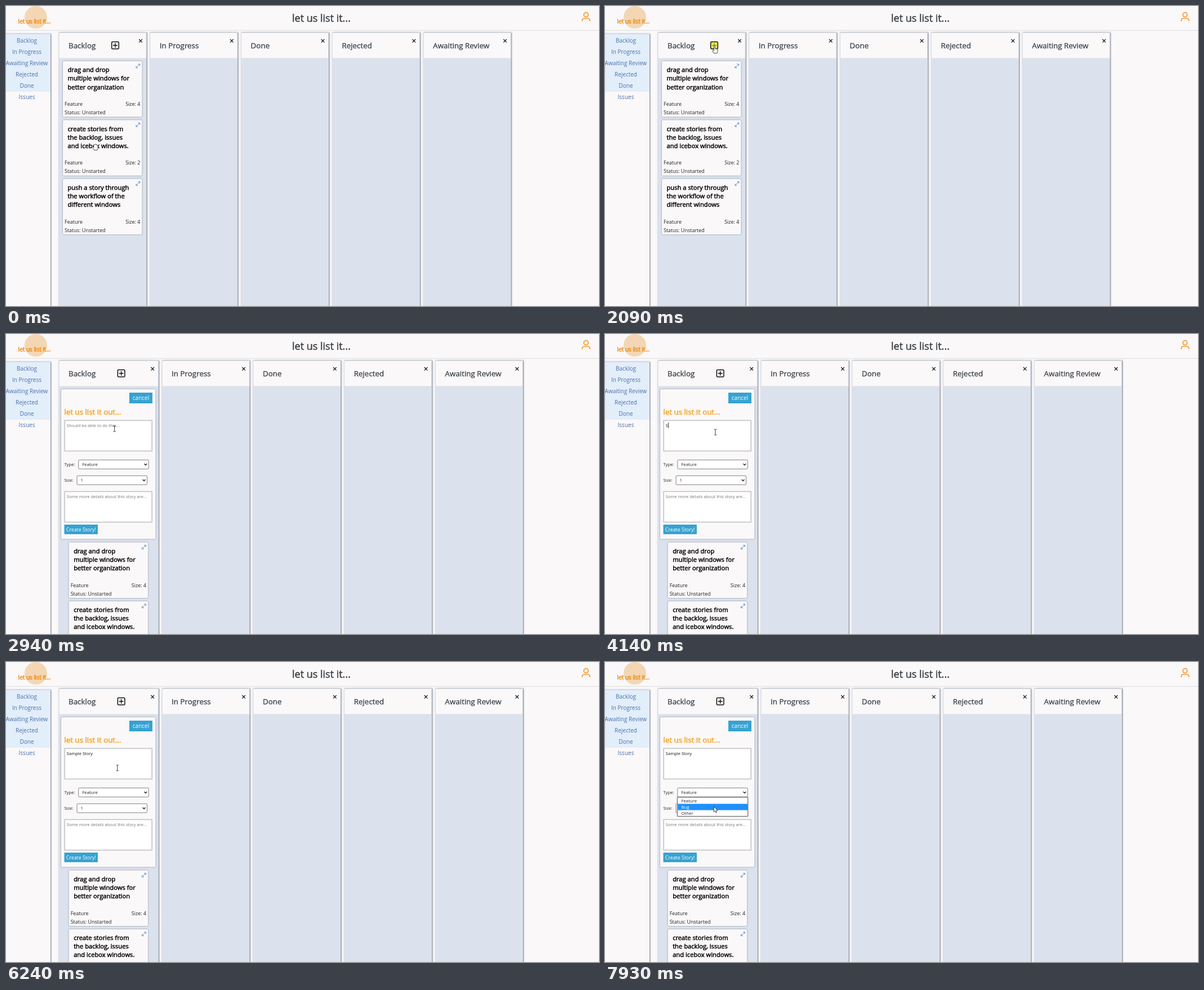
An HTML page for the animation above (8 s loop, 1053x532 px).

```html
<!DOCTYPE html>
<html lang="en">
<head>
<meta charset="utf-8">
<title>Story board</title>
<style>
html, body { margin: 0; width: 100%; height: 100%; overflow: hidden; background: #faf8f9; }
svg { display: block; }
text { font-family: "Open Sans", sans-serif; white-space: pre; }
.bold { stroke: currentColor; stroke-width: .45px; fill: currentColor; }
.panel { filter: drop-shadow(1.2px .5px .8px rgba(50, 65, 85, .75)); }
.card { filter: drop-shadow(.7px .9px .8px rgba(40, 50, 70, .55)); }
.cursor { stroke: #222; stroke-width: .8; fill: #fff; stroke-linejoin: round; }
</style>
</head>
<body>
<svg id="stage" width="1053" height="532" viewBox="0 0 1053 532"></svg>
<script>
const LOOP = 8000, OPEN_AT = 2160, DROP_AT = 7530;
const PAPER = '#faf8f9';
const stage = document.getElementById('stage');

const rect = (x, y, w, h, fill, more = '') =>
  `<rect x="${x}" y="${y}" width="${w}" height="${h}" fill="${fill}" ${more}/>`;
const text = (x, y, size, str, color = '#222', more = '') =>
  `<text x="${x}" y="${y}" font-size="${size}" fill="${color}" color="${color}" ${more}>${str}</text>`;
const line = (d, color, width, more = '') =>
  `<path d="${d}" fill="none" stroke="${color}" stroke-width="${width}" ${more}/>`;
const BOLD = 'class="bold"', MIDDLE = 'text-anchor="middle"', END = 'text-anchor="end"';

const cards = [
  [['drag and drop', 'multiple windows for', 'better organization'], 4],
  [['create stories from', 'the backlog, issues', 'and icebox windows.'], 2],
  [['push a story through', 'the workflow of the', 'different windows'], 4],
];

function card([lines, size], i, dx, dy) {
  return `<g transform="translate(${101 + dx} ${98 + dy + i * 104.3})">
    ${rect(0, 0, 140.5, 98.5, PAPER, 'rx="2" class="card"')}
    ${lines.map((s, n) => text(8.5, 19.3 + n * 15.1, 11.2, s, '#000', BOLD)).join('')}
    ${text(3, 79.2, 9, 'Feature')}${text(137.5, 79.2, 9, 'Size: ' + size, '#222', END)}
    ${text(3, 94.2, 9, 'Status: Unstarted')}
    ${line('M130.2 11.5L136.5 5.2M133.6 5H136.7V8.1M130 8.6V11.7H133.1', '#4b83bd', .9)}
  </g>`;
}

function column(name, x, width) {
  const cx = x + width - 10.5;
  return rect(x, 47, width, 500, '#dbe2ed', 'class="panel"') +
    rect(x + .5, 47.5, width - 1, 45.5, PAPER, 'stroke="#dadce0"') +
    text(x + 17.5, 75.3, 13.4, name, '#3b4046', 'class="bold" style="stroke-width:.3px"') +
    line(`M${cx - 2.8} 59l5.6 5.6m0 -5.6l-5.6 5.6`, '#111', 1.2);
}

function board(open) {
  const shift = open ? 21.3 : 0;
  const names = ['Backlog', 'In Progress', 'Done', 'Rejected', 'Awaiting Review'];
  const columns = names.map((name, i) =>
    column(name, 93.5 + i * 161.8 + (i ? shift : 0), 156 + (i ? 0 : shift)));
  return columns.join('') +
    `<g transform="translate(${194 + shift / 2} 69.7)">
      <rect class="plus" x="-6.3" y="-6.3" width="12.6" height="12.6" rx="1.6" stroke="#111" stroke-width="1.5"/>
      ${line('M-4 0H4M0 -4V4', '#111', 1.4, 'class="plusSign"')}
    </g>` +
    cards.map((c, i) => card(c, i, shift / 2, open ? 271.6 : 0)).join('');
}

const area = y => rect(104.2, y + .8, 155, 54.2, '#fff', 'stroke="#c3c3c3" stroke-width="1.6"');
const button = (x, y, w, h, size, label) =>
  rect(x, y, w, h, '#35a3d1') + text(x + w / 2, y + h / 2 + 3.5, size, label, '#fff', MIDDLE);
const select = (x, y, value) =>
  rect(x + .5, y + .5, 124.5, 16, '#fff', 'rx="1.5" stroke="#777" stroke-width=".9"') +
  text(x + 7, y + 11.2, 7.75, value) +
  line(`M${x + 117.2} ${y + 7.2}l2.4 2.5l2.4 -2.5`, '#222', 1.3);

const form = rect(98, 98, 167.5, 265.5, PAPER, 'rx="2" class="card"') +
  button(219, 104, 41, 19, 10, 'cancel') +
  text(103.5, 143, 13.3, 'let us list it out...', '#f79e1b', BOLD) +
  area(152.5) +
  `<text id="entry" x="107.8" y="164.6" font-size="7.55"></text>` +
  rect(0, 157, .8, 9.8, '#111', 'id="caret"') +
  text(103.5, 234, 7.7, 'Type:') + select(128.3, 222.8, 'Feature') +
  text(103.5, 262, 7.7, 'Size:') + select(125.5, 250.8, '1') +
  area(278.6) +
  text(107.8, 290.8, 7.55, 'Some more details about this story are...', '#757575') +
  button(103.5, 338, 59.5, 17, 8.9, 'Create Story!');

const options = ['Feature', 'Bug', 'Other'];
const menu = `<g id="menu">` +
  rect(128.8, 240, 124.7, 33.5, '#fff', 'stroke="#666" stroke-width=".9" class="card"') +
  rect(129.2, 0, 124, 11.2, '#1e90ff', 'id="pick"') +
  options.map((s, i) => text(135.5, 248.6 + i * 11.2, 7.75, s, '#222', 'class="option"')).join('') + `</g>`;

const sidebar = rect(-5, 49.5, 84, 500, PAPER, 'class="panel"') +
  rect(0, 50, 79, 102, '#e3eefb') +
  ['Backlog', 'In Progress', 'Awaiting Review', 'Rejected', 'Done', 'Issues']
    .map((s, i) => text(37, 64.5 + i * 20.15, 10, s, '#4a70a8', MIDDLE)).join('');

const header = rect(0, 0, 1053, 43, PAPER) + rect(0, 42.8, 1053, 1, '#dddcdd') +
  '<circle cx="53" cy="20" r="20" fill="#f3d7b4"/>' +
  text(50.5, 31, 10, 'let us list it...', '#ee8613', 'class="bold" text-anchor="middle"') +
  text(560, 28, 18, 'let us list it...', '#3b4046', 'class="bold" text-anchor="middle"') +
  '<circle cx="1030" cy="15.6" r="3.9" fill="none" stroke="#f09b30" stroke-width="1.7"/>' +
  line('M1023.3 27V25.5Q1023.3 22 1027 22H1033Q1036.8 22 1036.8 25.5V27', '#f09b30', 1.7);

const cursors = `<g id="cursor">
  <path class="cursor" data-kind="grab" d="M-2.6 5.5L-5 1.2Q-5.2 -.6 -3.2 .6V-3.6Q-2.2 -5.2 -1.4 -3.8Q-.4 -6 .6 -4Q1.8 -5.2 2.5 -3.2Q4 -3.8 4.3 -2V2L3 5.5Z"/>
  <path class="cursor" data-kind="hand" d="M-.9 .6Q0 -.8 1 .6V5Q2 4.2 2.6 5.4Q3.8 4.8 4.2 6Q5.6 5.6 5.7 7V9.5L4.5 13H-1.3L-4 8.6Q-3.5 6.6 -.9 8.6Z"/>
  <path class="cursor" data-kind="arrow" d="M0 0V9.6L2.2 7.6L3.7 11L5.2 10.3L3.7 7H6.7Z"/>
  <path data-kind="beam" d="M-2.3 -5H-.5L0 -4.5L.5 -5H2.3M0 -4.5V4.5M-2.3 5H-.5L0 4.5L.5 5H2.3" fill="none" stroke="#222" stroke-width=".9"/>
</g>`;

stage.innerHTML = rect(0, 0, 1053, 532, PAPER) + sidebar +
  `<g id="closed">${board(false)}</g><g id="opened">${board(true)}${form}${menu}</g>` +
  header + cursors;

const $ = id => document.getElementById(id);
const show = (el, on) => el.setAttribute('display', on ? 'inline' : 'none');

// Pointer moves: first step, last step, step count, bend point, end point.
const moves = [
  [220, 980, 11, [176, 193], [193, 136]],
  [1050, 1820, 12, [192.5, 102], [194, 69.5]],
  [1890, 2160, 5, [194, 70], [194.5, 71]],
  [2310, 3080, 12, [184, 160], [195, 172]],
  [3150, 3280, 2, [196, 173], [196, 174]],
  [6240, 6650, 7, [206, 245], [199, 300]],
  [6850, 7330, 8, [196, 266], [193, 233]],
  [7530, 7930, 7, [193, 245], [193.3, 256.3]],
];

function pointerAt(t) {
  let at = [159, 250];
  for (const [from, to, steps, bend, end] of moves) {
    if (t < from) break;
    const done = Math.floor((t - from + 4) / ((to - from) / (steps - 1))) + 1;
    const p = Math.min(1, done / steps);
    const e = (p + p * p * (3 - 2 * p)) / 2;
    at = at.map((a, i) => a * (1 - e) ** 2 + 2 * bend[i] * e * (1 - e) + end[i] * e * e);
  }
  return at;
}

function cursorKind(t, y) {
  if (t < 3200 && y < 80) return 'hand';
  if (t < OPEN_AT) return 'grab';
  if ((y > 153 && y < 208) || (y > 279 && y < 334)) return 'beam';
  return t < 3200 ? 'grab' : 'arrow';
}

const STORY = 'Sample Story';
const keyTimes = [4140, 4340, 4540, 4610, 4680, 4750, 4820, 5020, 5220, 5290, 5370, 5440];
const caretOn = [[3280, 3680], [4140, 5960], [6450, 6980], [7480, DROP_AT]];

function draw(t) {
  const [x, y] = pointerAt(t);
  const open = t >= OPEN_AT, kind = cursorKind(t, y);
  show($('closed'), !open);
  show($('opened'), open);

  const hover = t >= 1750 && t < 2310;
  document.querySelectorAll('.plus').forEach(el => el.setAttribute('fill', hover ? '#f8f04a' : PAPER));
  document.querySelectorAll('.plusSign').forEach(el => el.setAttribute('stroke', hover ? '#8b8930' : '#111'));

  const typed = STORY.slice(0, keyTimes.filter(k => t >= k).length);
  const entry = $('entry');
  entry.textContent = typed || 'Should be able to do this...';
  entry.setAttribute('fill', typed ? '#111' : '#757575');
  if (open) $('caret').setAttribute('x', 107.9 + (typed ? entry.getComputedTextLength() : 0));
  show($('caret'), caretOn.some(([a, b]) => t >= a && t < b));

  const picked = y > 251 ? 1 : 0;
  show($('menu'), t >= DROP_AT);
  $('pick').setAttribute('y', 240.3 + picked * 11.2);
  document.querySelectorAll('.option').forEach((el, i) => el.setAttribute('fill', i === picked ? '#fff' : '#222'));

  $('cursor').setAttribute('transform', `translate(${x} ${y})`);
  for (const el of $('cursor').children) show(el, el.dataset.kind === kind);
}

function tick() {
  draw(performance.now() % LOOP);
  requestAnimationFrame(tick);
}
tick();
</script>
</body>
</html>
```
